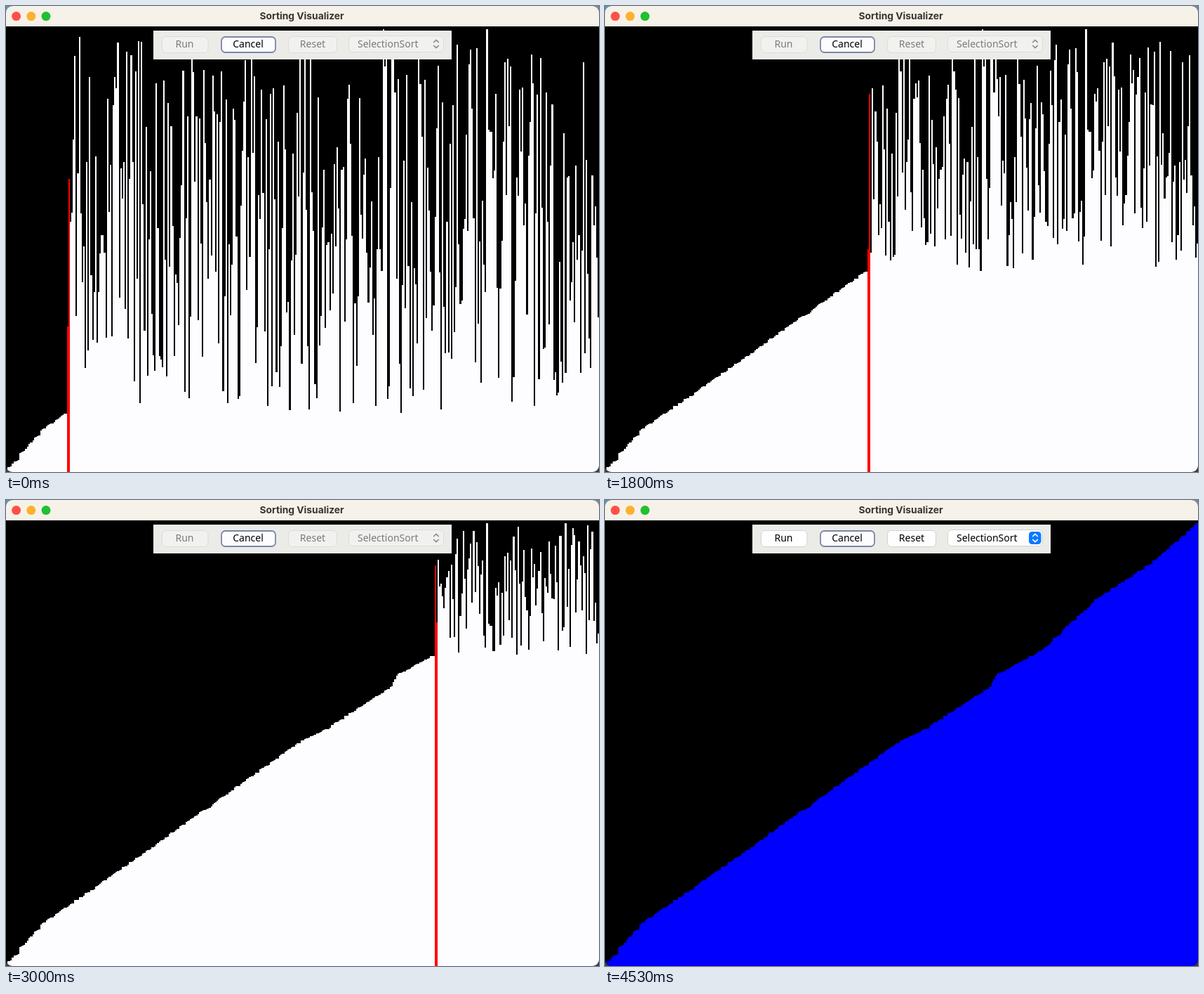
Write an HTML page with a canvas that moves like this. It is 845 px wide and 663 px high and loops after 4.59 s.

```html
<!DOCTYPE html>
<html lang="en">
<head>
<meta charset="utf-8">
<title>Sorting Visualizer</title>
<style>
html, body { margin: 0; width: 845px; height: 663px; overflow: hidden; background: #000; }
canvas { display: block; }
</style>
</head>
<body>
<canvas id="stage" width="845" height="663"></canvas>
<script>
const W = 845, H = 663, COUNT = 400, FIRST = 41;
const LOOP = 4590, LAST_FRAME = 68, SORT_END = 57.6;
const ctx = document.getElementById('stage').getContext('2d');

// Key points of the sorted slope: x and top edge.
const slope = [[0, 663], [55, 600], [110, 563], [210, 493], [420, 343], [455, 327],
  [552, 264], [556, 250], [625, 212], [700, 141], [780, 89], [845, 32]];

const edge = i => Math.round(i * W / COUNT);

function random(seed) {
  return () => {
    seed = (seed * 1664525 + 1013904223) >>> 0;
    return seed / 4294967296;
  };
}
const next = random(7);

function slopeTop(x) {
  const k = Math.max(1, slope.findIndex(p => p[0] >= x));
  const [x0, y0] = slope[k - 1], [x1, y1] = slope[k];
  return y0 + (y1 - y0) * (x - x0) / (x1 - x0);
}

// Jittered samples, sorted, give the small uneven steps.
const tops = Array.from({ length: COUNT }, (_, i) => {
  const x = (i + 0.5 + (next() - 0.5) * 3) * W / COUNT;
  return Math.round(slopeTop(Math.min(W, Math.max(0, x))));
}).sort((a, b) => b - a);

function shuffleFrom(first) {
  const order = Array.from({ length: COUNT }, (_, i) => i);
  for (let i = COUNT - 1; i > first; i--) {
    const j = first + Math.floor(next() * (i - first + 1));
    [order[i], order[j]] = [order[j], order[i]];
  }
  return order;
}
const initial = shuffleFrom(FIRST);

function selectionSort(sorted) {
  const order = initial.slice();
  for (let i = FIRST; i < sorted; i++) {
    const j = order.indexOf(i);
    [order[i], order[j]] = [order[j], order[i]];
  }
  return order;
}

// Passes get shorter as the unsorted part shrinks.
function sortedCount(frame) {
  const rush = 24 * (frame / SORT_END) ** 16;
  return Math.round(FIRST + frame * (4.38 + 0.025 * frame) + rush);
}

const checkedCount = frame => Math.round((frame - SORT_END) * 40.7 - 4);

function drawBars(frame) {
  const checking = frame >= SORT_END;
  const cursor = checking ? checkedCount(frame) : sortedCount(frame);
  const order = selectionSort(checking ? COUNT : cursor);
  for (let i = 0; i < COUNT; i++) {
    let color = '#fdfcff';
    if (checking && i < cursor) color = '#0000ff';
    if (checking && i === cursor) color = '#e00028';
    if (!checking && (i === cursor || i === cursor + 1)) color = '#ff0000';
    const x = edge(i), y = tops[order[i]];
    ctx.fillStyle = color;
    ctx.fillRect(x, y, edge(i + 1) - x, H - y);
  }
}

function roundBox(x, y, w, h, r, fill, stroke, line = 1) {
  ctx.beginPath();
  ctx.roundRect(x, y, w, h, r);
  ctx.fillStyle = fill;
  ctx.fill();
  if (stroke) {
    ctx.strokeStyle = stroke;
    ctx.lineWidth = line;
    ctx.stroke();
  }
}

function label(text, x, y, color, font, align = 'center') {
  ctx.font = font;
  ctx.textAlign = align;
  ctx.fillStyle = color;
  ctx.fillText(text, x, y);
}

function drawTitleBar() {
  ctx.fillStyle = '#f6f2e9';
  ctx.fillRect(0, 0, W, 29);
  ['#ff5147', '#fdb12d', '#20c030'].forEach((color, i) => {
    ctx.beginPath();
    ctx.arc(14.6 + i * 21.2, 14.6, 6.5, 0, Math.PI * 2);
    ctx.fillStyle = color;
    ctx.fill();
  });
  label('Sorting Visualizer', 421.6, 19, '#373431', '700 13.8px Inter, sans-serif');
}

function chevrons(color) {
  ctx.strokeStyle = color;
  ctx.lineWidth = 1.5;
  ctx.lineCap = ctx.lineJoin = 'round';
  for (const s of [-1, 1]) {
    ctx.beginPath();
    ctx.moveTo(609.6, 54 + s * 2.4);
    ctx.lineTo(613, 54 + s * 5.6);
    ctx.lineTo(616.4, 54 + s * 2.4);
    ctx.stroke();
  }
}

function drawPanel(enabled) {
  const font = '14px "Noto Sans", sans-serif';
  const fill = enabled ? '#fefefe' : '#f1f1ef';
  const border = enabled ? '#d2d2d0' : '#dcdcdc';
  const ink = enabled ? '#000' : '#7b7b79';
  ctx.fillStyle = '#ebebe8';
  ctx.fillRect(210, 35, 425, 41);
  roundBox(222.5, 43.5, 65.5, 23, 5.5, fill, border);
  roundBox(307, 44, 77, 22, 5.5, '#fdfcff', '#7d86a6', 1.8);
  roundBox(402.5, 43.5, 69, 23, 5.5, fill, border);
  roundBox(488.5, 42.5, 135, 23, 5.5, fill, border);
  label('Run', 254.5, 59.3, ink, font);
  label('Cancel', 345, 59.3, '#000', font);
  label('Reset', 437, 59.3, ink, font);
  label('SelectionSort', 501, 59.3, ink, font, 'left');
  if (enabled) roundBox(604, 45, 17.5, 18, 4.5, '#0a7aff');
  chevrons(enabled ? '#fff' : '#8c8c8a');
}

function drawBackdrop() {
  const sky = ctx.createLinearGradient(0, 0, W, 0);
  sky.addColorStop(0, '#4f9cbe');
  sky.addColorStop(1, '#7d8b96');
  ctx.fillStyle = sky;
  ctx.fillRect(0, 0, W, 30);
  ctx.fillStyle = '#3c3c3c';
  ctx.fillRect(0, 30, W, H - 30);
}

function draw(time) {
  const frame = Math.min(LAST_FRAME, Math.floor((time + 4) * 0.015));
  drawBackdrop();
  ctx.save();
  ctx.beginPath();
  ctx.roundRect(0, 0, W, H, 9);
  ctx.clip();
  ctx.fillStyle = '#000';
  ctx.fillRect(0, 0, W, H);
  drawBars(frame);
  drawTitleBar();
  drawPanel(frame === LAST_FRAME);
  ctx.restore();
}

const start = performance.now();
function tick() {
  draw((performance.now() - start) % LOOP);
  requestAnimationFrame(tick);
}
tick();
</script>
</body>
</html>
```
